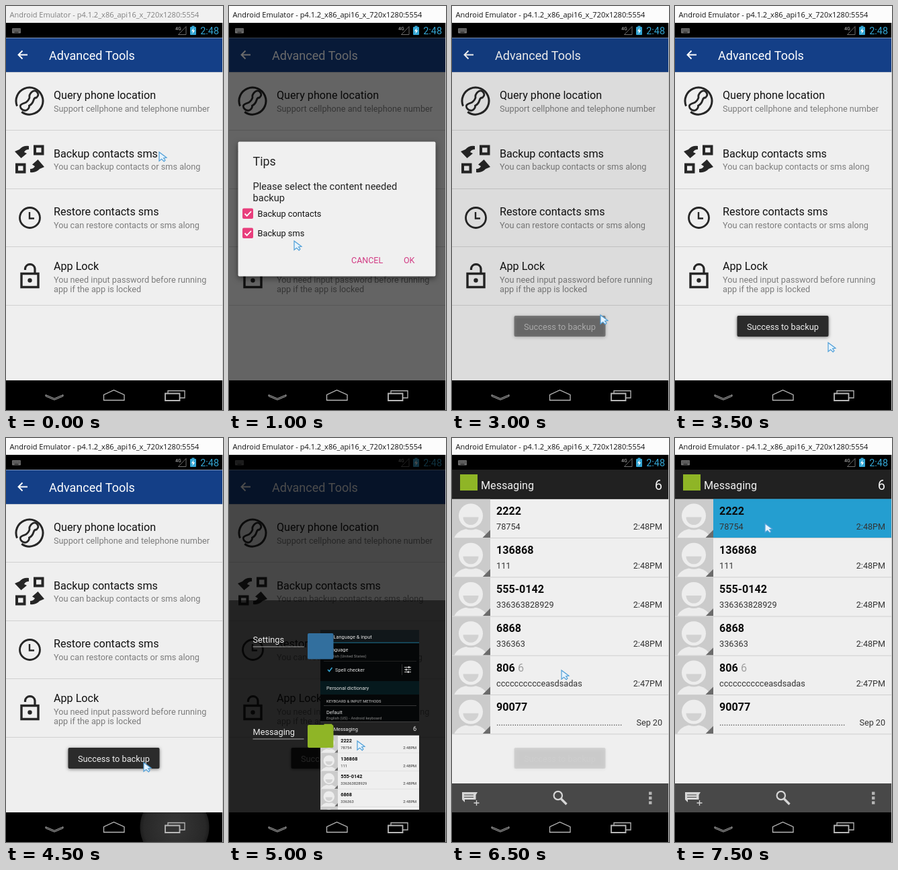
Recreate the animation shown at these times as an HTML page with a canvas. Size 323 by 600 pixels, loop 8 s.

```html
<!DOCTYPE html>
<html lang="en">
<head>
<meta charset="utf-8">
<title>Advanced Tools</title>
<style>
html, body { margin: 0; width: 100%; height: 100%; overflow: hidden; background: #000; }
canvas { display: block; width: 323px; height: 600px; }
</style>
</head>
<body>
<canvas id="stage" width="323" height="600"></canvas>
<script>
const ctx = document.getElementById('stage').getContext('2d');
const BLUE = '#33a6d4', PINK = '#e83e7c', INK = '#262626';

function rect(x, y, w, h, color) {
  ctx.fillStyle = color;
  ctx.fillRect(x, y, w, h);
}
function round(x, y, w, h, r, color) {
  ctx.fillStyle = color;
  ctx.beginPath();
  ctx.roundRect(x, y, w, h, r);
  ctx.fill();
}
function disc(x, y, r, color) {
  ctx.fillStyle = color;
  ctx.beginPath();
  ctx.arc(x, y, r, 0, 7);
  ctx.fill();
}
function fill(d, color) {
  ctx.fillStyle = color;
  ctx.fill(new Path2D(d));
}
function stroke(d, color, w = 1) {
  ctx.strokeStyle = color;
  ctx.lineWidth = w;
  ctx.stroke(new Path2D(d));
}
function text(s, x, y, size, color, align = 'left', weight = 400) {
  ctx.font = `${weight} ${size}px Roboto, sans-serif`;
  ctx.textAlign = align;
  ctx.fillStyle = color;
  ctx.fillText(s, x, y);
}
function fade(alpha, draw) {
  ctx.save();
  ctx.globalAlpha *= alpha;
  draw();
  ctx.restore();
}
function shadowed(blur, dy, draw) {
  ctx.save();
  ctx.shadowColor = 'rgba(0,0,0,.5)';
  ctx.shadowBlur = blur;
  ctx.shadowOffsetY = dy;
  draw();
  ctx.restore();
}

// Window chrome
function titleBar(active) {
  rect(0, 0, 323, 25, active ? '#fcfcfc' : '#f1f1f1');
  ctx.font = '11.02px "Open Sans", sans-serif';
  ctx.textAlign = 'left';
  ctx.fillStyle = active ? '#111' : '#808080';
  ctx.fillText('Android Emulator - p4.1.2_x86_api16_x_720x1280:5554', 5.5, 16.5);
}
function statusBar() {
  rect(0, 25, 322, 22.5, '#000');
  round(9, 33, 13, 7.5, 1, '#6f6f6f');
  ctx.setLineDash([1, 1.4]);
  stroke('M10.5 35H21M10.5 37H21', '#111');
  ctx.setLineDash([]);
  stroke('M12.5 39H18.5', '#111');
  text('4G', 252, 36, 7, '#999', 'left', 500);
  stroke('M256.5 42.5H268V30.5Z', '#6d6d6d');
  rect(276.5, 29.5, 4, 2, BLUE);
  round(274, 31, 9, 12, 1, BLUE);
  fill('M279.5 32.5L276 37.5H278.3L277.3 41.5L281.3 36.3H278.8Z', '#fff');
  text('2:48', 317, 42, 14.4, BLUE, 'right');
}
function navBar(ripple) {
  rect(0, 556, 322, 44, '#000');
  if (ripple) {
    ctx.save();
    ctx.beginPath();
    ctx.rect(0, 556, 322, 44);
    ctx.clip();
    const g = ctx.createRadialGradient(251, 578, 10, 251, 578, 52);
    g.addColorStop(0, '#343434');
    g.addColorStop(.85, '#282828');
    g.addColorStop(1, '#1c1c1c');
    disc(251, 578, 51.5, g);
    ctx.restore();
  }
  const c = '#b8b8b8';
  stroke('M59 577.5L72 583L85 577.5V579.5L72 585L59 579.5Z', c, 1);
  stroke('M145.5 585.5V577.5L160.5 570.5L176 577.5V585.5Z', c, 1.3);
  stroke('M237 575.5H258.5V586H237Z', c, 1.8);
  stroke('M241 575V571.5H266V582H259', c, 1.3);
}
function edge() {
  rect(322, 25, 1, 575, '#c9c9c9');
}

// Tools list
function phoneIcon() {
  ctx.strokeStyle = INK;
  ctx.lineWidth = 3;
  ctx.beginPath();
  ctx.arc(35, 141, 20, 2.75, 2.2 + Math.PI * 2);
  ctx.stroke();
  stroke('M38 128Q42 124 46 127.5Q50 132 45.5 136Q42 136 41 140Q39 146 34.5 148Q35 152 31 154.5Q26 157 22 151.5Q19.5 147 25 145Q28 144 30 143Q34 140 35 136Q34 132 38 128Z', INK, 2.8);
}
function swapIcon() {
  stroke('M43 208.5H54.5V219.5H43ZM16 235.5H27.5V246.5H16Z', INK, 4);
  fill('M34 208Q25 207 20 213L13 216L22.5 226L31 219L27 217Q29 213 34 213Z', INK);
  fill('M36 247Q45 248 50 242L57 239L47.5 228L39 235.5L43 238Q41 242 36 242Z', INK);
}
function clockIcon() {
  stroke('M50.5 314.5A15 15 0 1 0 20.5 314.5A15 15 0 1 0 50.5 314.5Z', INK, 2.8);
  stroke('M35 306V315.5H42', INK, 2.4);
}
function lockIcon() {
  stroke('M23 397.5H48V417.5H23Z', INK, 3.4);
  stroke('M28.5 392V390A7.3 7.3 0 0 1 43 390V397', INK, 3.2);
  disc(35.5, 407.5, 3.2, INK);
}
const tools = [
  ['Query phone location', 'Support cellphone and telephone number', phoneIcon],
  ['Backup contacts sms', 'You can backup contacts or sms along', swapIcon],
  ['Restore contacts sms', 'You can restore contacts or sms along', clockIcon],
  ['App Lock', 'You need input password before running', lockIcon]
];
function toolsList(pressed) {
  rect(0, 47, 322, 510, '#efefef');
  rect(0, 47.5, 322, 50.5, '#143f87');
  rect(0, 98, 322, 1, '#c4c8d0');
  stroke('M32 72.5H19M24.5 66.5L18.5 72.5L24.5 78.5', '#fff', 1.9);
  text('Advanced Tools', 64, 79.5, 18, '#fff');
  tools.forEach(([name, note, icon], i) => {
    const y = 98 + i * 86.7, shift = i === 3 ? -6 : 0;
    if (i === pressed) rect(0, y, 322, 86, '#d8d8d8');
    rect(0, Math.round(y + 86), 322, 1, '#d0d0d0');
    text(name, 71, y + 40 + shift, 16.15, '#111');
    text(note, 71, y + 58.5 + shift, 12.7, '#7c7c7c');
    icon();
  });
  text('app if the app is locked', 71, 425, 12.7, '#7c7c7c');
}
function dim(alpha, top = 47, bottom = 556) {
  rect(0, top, 322, bottom - top, `rgba(0,0,0,${alpha})`);
}
function dialog(pressed) {
  shadowed(9, 3, () => round(13.5, 201.5, 294, 200, 2, '#f0f0f0'));
  text('Tips', 35.5, 236.5, 17.9, '#222');
  text('Please select the content needed', 35.5, 273, 14.6, '#222');
  text('backup', 35.5, 290, 14.6, '#222');
  ['Backup contacts', 'Backup sms'].forEach((label, i) => {
    const y = 300.5 + i * 29;
    round(20, y, 16, 15.5, 2, PINK);
    stroke(`M23.5 ${y + 8}L26.7 ${y + 11.2}L33 ${y + 4.5}`, '#fff', 1.8);
    text(label, 42.5, y + 12.5, 12.75, '#111');
  });
  if (pressed) round(247, 361, 42, 32, 2, '#dadada');
  text('CANCEL', 182, 381.5, 12.5, '#d23c84');
  text('OK', 260, 381.5, 12.5, '#d23c84');
}
function toast() {
  shadowed(5, 1, () => round(92.5, 460, 136, 31, 2, '#2b2b2b'));
  text('Success to backup', 107, 480.5, 12.75, '#eee');
}

// Messaging app, drawn from the top of its header
const chats = [
  ['2222', '78754', '2:48PM'],
  ['136868', '111', '2:48PM'],
  ['555-0142', '336363828929', '2:48PM'],
  ['6868', '336363', '2:48PM'],
  ['806', 'c'.repeat(10) + 'easdsadas', '2:47PM'],
  ['90077', '.'.repeat(56), 'Sep 20']
];
function avatar(y) {
  ctx.save();
  ctx.beginPath();
  ctx.rect(0, y, 57, 57.5);
  ctx.clip();
  rect(0, y, 57, 58, '#cbcbcb');
  ctx.fillStyle = '#ececec';
  ctx.beginPath();
  ctx.ellipse(28, y + 61, 25, 17, 0, 0, 7);
  ctx.fill();
  disc(28, y + 26, 20, '#cbcbcb');
  disc(28, y + 25, 18, '#ededed');
  ctx.fillStyle = '#d2d2d2';
  ctx.beginPath();
  ctx.arc(28, y + 27, 11.5, 0, Math.PI);
  ctx.fill();
  fill(`M57 ${y + 46}V${y + 57.5}H45.5Z`, '#6b6b6b');
  ctx.restore();
}
function messaging(pressed) {
  rect(0, 0, 322, 510, '#efefef');
  rect(0, 0, 322, 43.5, '#212121');
  rect(0, 42.5, 322, 1, '#0c0c0c');
  rect(12, 7, 26, 24, '#8fb526');
  text('Messaging', 43, 28.5, 16.15, '#f2f2f2');
  text('6', 313, 30, 20, '#f2f2f2', 'right');
  chats.forEach(([name, body, time], i) => {
    const y = 43.5 + i * 58.25;
    if (i === pressed) rect(57, y, 265, 57.5, '#249ed0');
    avatar(y);
    rect(0, y + 57.5, 322, 1, '#cfcfcf');
    text(name, 66, y + 23, 16.1, '#0b0b0b', 'left', 700);
    if (i === 4) text('6', 98, y + 23, 16.1, '#a0a0a0');
    text(body, 66, y + 45, 12.7, '#333');
    text(time, 313, y + 45, 12.6, '#333', 'right');
  });
  rect(0, 466, 322, 44, '#484848');
  fill('M15 479H38L35.5 483V490H19V494L15 490Z', '#d6d6d6');
  stroke('M18 483H32M18 486.5H32', '#484848', 1.2);
  stroke('M36.5 490.5V499.5M32 495H41', '#484848', 4);
  stroke('M36.5 491V499M32.5 495H40.5', '#d6d6d6', 1.3);
  stroke('M164 484A6.2 6.2 0 1 0 151.6 484A6.2 6.2 0 1 0 164 484Z', '#d6d6d6', 2.2);
  stroke('M162.5 489L170.5 497', '#d6d6d6', 3.4);
  const dot = 4.4;
  for (let k = 0; k < 3; k++) rect(293, 478.5 + k * 7, dot, dot, '#b5b5b5');
}
function messagingApp(pressed) {
  ctx.save();
  ctx.translate(0, 47);
  messaging(pressed);
  ctx.restore();
}

// Recent apps
function label(name, y) {
  text(name, 35.5, y, 12.75, '#eee');
  rect(35.5, y + 5.5, 76, 1, '#a5a5a5');
}
function settingsThumb() {
  const c = '#e2e2e2', x = 145;
  rect(136, 285, 147, 136.5, '#050708');
  rect(136, 285, 147, 19, '#11171a');
  text('Language & input', 155.5, 297.5, 7.4, c);
  rect(136, 303.5, 147, 1, '#1f7898');
  text('Language', x, 317, 7.4, c);
  text('English (United States)', x, 326, 5.9, '#888');
  rect(141, 331, 138, .6, '#333');
  stroke('M147 344L149.3 346.5L153.5 341', BLUE, 1.5);
  text('Spell checker', 158, 347, 7.4, c);
  rect(257, 336, .7, 16, '#444');
  stroke('M261 340.5H271M261 344H271M261 347.5H271', c, .9);
  rect(267, 339, 1.5, 3, c);
  rect(263, 342.5, 1.5, 3, c);
  rect(266, 346, 1.5, 3, c);
  rect(136, 361, 147, 20, '#06191d');
  text('Personal dictionary', x, 374, 7.4, c);
  text('KEYBOARD & INPUT METHODS', x, 393, 5.8, '#aaa', 'left', 500);
  rect(141, 397, 138, .8, '#444');
  text('Default', x, 410, 7.4, c);
  text('English (US) - Android keyboard', x, 418, 5.9, '#888');
}
function messagingThumb() {
  ctx.save();
  ctx.beginPath();
  ctx.rect(136, 421.5, 147, 130.5);
  ctx.clip();
  ctx.translate(136, 421.5);
  ctx.scale(.457, .457);
  messaging(-1);
  ctx.restore();
}
function recents(alpha) {
  fade(alpha, () => {
    settingsThumb();
    label('Settings', 304);
    label('Messaging', 441);
  });
  messagingThumb();
  fade(alpha, () => round(117, 290, 38.5, 38.5, 2, '#326f9e'));
  fade(alpha < 1 ? .25 : 1, () => round(117, 426, 38.5, 34, 2, '#8fb526'));
}

function cursor(x, y) {
  const d = 'M0 0V13.2L3.6 10.4L7.2 14L9 12L6.6 9L11 8.2Z';
  ctx.save();
  ctx.translate(x, y);
  fill(d, '#e6f3fc');
  stroke(d, '#4f9fd8', 1.2);
  ctx.restore();
}

// Scenes
function home(pressed) {
  statusBar();
  toolsList(pressed);
}
function asking(pressed) {
  home();
  dim(.58);
  dialog(pressed);
}
function toasted() {
  home();
  toast();
}
function switcher() {
  toasted();
  dim(.7, 25, 241);
  dim(.85, 241);
  recents(1);
}
function opening() {
  rect(0, 25, 322, 531, '#000');
  fade(.65, statusBar);
  recents(.36);
  fade(.14, toast);
}
function inbox(pressed) {
  statusBar();
  messagingApp(pressed);
}

// One entry per half second: cursor x, cursor y, scene
const steps = [
  [228, 217, () => home()],
  [228, 217, () => home(1)],
  [97, 349, () => asking()],
  [155, 355, () => asking()],
  [264, 371, () => asking()],
  [264, 371, () => asking(true)],
  [221, 459, () => { home(); dim(.08); fade(.5, toast); }],
  [228, 500, toasted],
  [244, 569, toasted],
  [205, 482, toasted],
  [191, 450, switcher],
  [178, 396, switcher],
  [166, 353, opening],
  [163, 345, () => { inbox(-1); fade(.12, toast); }],
  [142, 190, () => inbox(-1)],
  [134, 127, () => inbox(0)]
];
let shown = -1;
function render(now) {
  const i = Math.floor(now % 8000 / 500);
  if (i !== shown) {
    shown = i;
    const [x, y, scene] = steps[i];
    ctx.clearRect(0, 0, 323, 600);
    titleBar(i > 0);
    scene();
    navBar(i === 9);
    edge();
    cursor(x, y);
  }
  requestAnimationFrame(render);
}
render(performance.now());
</script>
</body>
</html>
```
